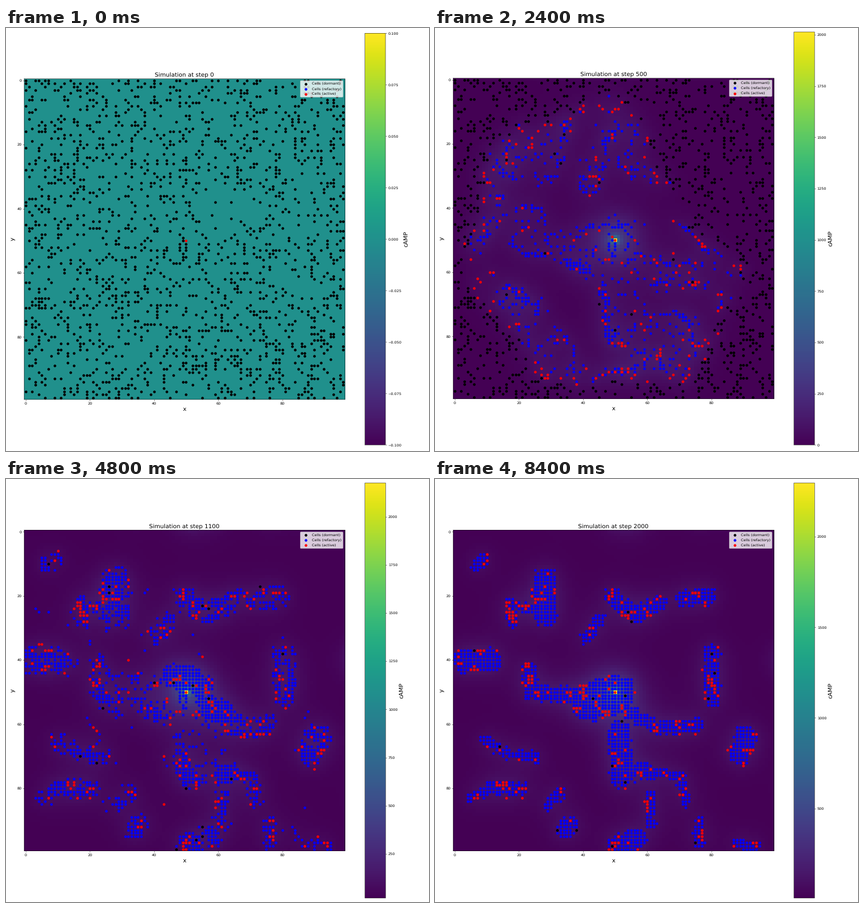
Animation, 748 px wide and 748 px high, one loop 8.8 s. Source, as a matplotlib script:

```python
import numpy as np
import matplotlib.pyplot as plt
from matplotlib.animation import FuncAnimation

plt.rcParams.update({"path.snap": False, "text.hinting": "none"})

SIZE, COUNT, FRAMES = 100, 1720, 22
rng = np.random.default_rng(11)
Y, X = np.mgrid[0:SIZE, 0:SIZE].astype(float)
RADIUS = np.hypot(X - 50, Y - 50)

# Key points of the streams the cells gather in, by half width.
STREAMS = {
    6.0: [[(42, 53), (50, 50.5)]],
    3.6: [[(51, 62), (52, 76)], [(28, 15), (28, 26)], [(3, 40), (11, 40)],
          [(91, 64), (89, 69)], [(51, 98), (56, 96)]],
    2.4: [[(23, 43), (24, 50), (38, 51)], [(55, 57), (64, 61), (75, 60)],
          [(49, 20), (56, 26), (64, 22)], [(71, 21), (79, 20)],
          [(80, 38), (80, 52)], [(56, 74), (61, 75)], [(11, 80), (20, 80)],
          [(34, 93), (36, 91)]],
    1.6: [[(17, 22), (18, 28)], [(20, 23), (25, 24)], [(45, 27), (41, 33)],
          [(61, 75), (70, 76), (72, 84)], [(61, 82), (61, 91)],
          [(9, 65), (16, 69), (25, 70)], [(5, 83), (11, 80)],
          [(29, 85), (33, 81)], [(76, 90), (76, 97)],
          [(88, 97), (94, 98)], [(6, 11), (9, 8)]],
}


def segment_distance(a, b):
    dx, dy = b[0] - a[0], b[1] - a[1]
    t = ((X - a[0]) * dx + (Y - a[1]) * dy) / (dx * dx + dy * dy)
    t = np.clip(t, 0, 1)
    return np.hypot(X - a[0] - t * dx, Y - a[1] - t * dy)


DEPTH = np.min([segment_distance(a, b) - width
                for width, lines in STREAMS.items()
                for line in lines for a, b in zip(line, line[1:])], axis=0)


def lowest(score):
    """The COUNT lattice sites with the lowest score, centre left free."""
    score[50, 50] = np.inf
    rows, cols = np.unravel_index(np.argsort(score, axis=None)[:COUNT], score.shape)
    return np.column_stack([cols, rows]).astype(float)


def gathered(jitter):
    return lowest(DEPTH + jitter * rng.standard_normal(DEPTH.shape))


def match(a, b):
    """Reorder b so that each point of a gets a nearby partner."""
    dist = np.hypot(a[:, None, 0] - b[None, :, 0], a[:, None, 1] - b[None, :, 1])
    dist += 1e-3 * rng.random(dist.shape)
    left, right = np.arange(len(a)), np.arange(len(b))
    out = np.empty_like(b)
    while len(left):
        near = dist.argmin(1)
        mutual = dist.argmin(0)[near] == np.arange(len(left))
        out[left[mutual]] = b[right[near[mutual]]]
        keep = np.ones(len(right), bool)
        keep[near[mutual]] = False
        dist = dist[~mutual][:, keep]
        left, right = left[~mutual], right[keep]
    return out


def arrival(p):
    """Step at which the wave wakes a cell; it lags towards the upper right."""
    dx, dy = p[:, 0] - 50, p[:, 1] - 50
    r, angle = np.hypot(dx, dy), np.arctan2(dy, dx)
    turn = np.angle(np.exp(1j * (angle + 0.55)))
    speed = 1 - 0.6 * np.exp(-(turn / 0.75) ** 2) + 0.07 * np.sin(7 * angle)
    t = np.minimum(8.7 * r ** 1.06 / speed, 620 + 2.2 * r)
    return np.maximum(t + 10 * rng.standard_normal(len(p)), 5)


sparse = 0.12 * np.exp(-((X - 60) ** 2 + (Y - 39) ** 2) / 40)
start = lowest(rng.random((SIZE, SIZE)) + sparse)
loose = match(start, gathered(1.7))
final = match(loose, gathered(0.35))
wake = arrival(start)
order = np.argsort(-wake)

heat = rng.random((SIZE, SIZE))
heat = heat + 0.5 * sum(np.roll(heat, d, ax) for d in (-1, 1) for ax in (0, 1))
wrap = np.hypot(np.minimum(X, SIZE - X), np.minimum(Y, SIZE - Y))
kernel = np.exp(-wrap / 2.8)
KERNEL = np.fft.rfft2(kernel / kernel.sum())
OFFSETS = sorted(((i, j) for i in range(-6, 7) for j in range(-6, 7)),
                 key=lambda o: o[0] ** 2 + o[1] ** 2)


def positions(step):
    """Lattice places of all cells, at most one cell to a site."""
    gather = 1 - np.exp(-np.maximum(step - wake, 0) / 180)[:, None]
    settle = np.clip((step - 700) / 1300, 0, 1) ** 0.6
    p = start + (loose - start) * gather + (final - loose) * gather * settle
    p = np.rint(p).astype(int)
    taken = {(50, 50)}
    for i in order:
        x, y = p[i]
        for dx, dy in OFFSETS:
            site = (x + dx, y + dy)
            if site not in taken and 0 <= min(site) and max(site) < SIZE:
                break
        taken.add(site)
        p[i] = site
    return p


def states(p, step, noise):
    """0 dormant, 1 refractory, 2 active."""
    age = step - wake
    awake = age >= 0
    state = awake.astype(int)
    if awake.any():
        level = heat[p[:, 1], p[:, 0]] + 0.4 * noise.random(COUNT)
        state[awake & (level > np.quantile(level[awake], 0.86))] = 2
        state[awake & (age > 60) & (noise.random(COUNT) < 0.012)] = 0
        state[awake & (age < 28) & (noise.random(COUNT) < 0.7)] = 2
    return state


def limits(step):
    x = max(step - 500, 0) / 400
    return 23 * x * np.exp(1 - x), 746 + 204 * np.log(max(step, 2))


def field(p, step, low, high):
    age = step - wake
    fresh = 1 + 2 * np.exp(-np.maximum(age, 0) / 120)
    source = np.zeros((SIZE, SIZE))
    source[p[:, 1], p[:, 0]] = np.where(age >= 0, fresh, 0)
    camp = low + 290 * np.fft.irfft2(np.fft.rfft2(source) * KERNEL, s=source.shape)
    glow = 470 * np.exp(-RADIUS / 4.5) + 350 * np.exp(-(RADIUS / 1.3) ** 2)
    camp += min(1, step / 150) * glow
    camp[50, 50] = high
    return camp


fig = plt.figure(figsize=(16, 16), dpi=46.75)


def draw(k):
    step = max(k - 1, 0) * 100
    p = positions(step)
    if k == 0:
        low, high, camp = -0.1, 0.1, np.zeros((SIZE, SIZE))
    else:
        low, high = limits(step)
        camp = field(p, step, low, high)
    cells = np.vstack([p, [50, 50]])
    state = np.append(states(p, step, np.random.default_rng(k)), 2)

    fig.clf()
    ax = fig.add_subplot()
    im = ax.imshow(camp, vmin=low, vmax=high, cmap="viridis", interpolation="nearest")
    kinds = [("dormant", "black"), ("refactory", "blue"), ("active", "red")]
    for i, (name, color) in enumerate(kinds):
        x, y = cells[state == i].T
        ax.scatter(x, y, c=color, label=f"Cells ({name})")
    ax.set(xlim=(-0.5, SIZE - 0.5), ylim=(SIZE - 0.5, -0.5))
    ax.set_title(f"Simulation at step {step}", fontsize=16)
    ax.set_xlabel("x", fontsize=16)
    ax.set_ylabel("y", fontsize=16)
    ax.legend(loc="upper right")
    fig.colorbar(im, ax=ax).set_label("cAMP", fontsize=16)
    fig.tight_layout()


anim = FuncAnimation(fig, draw, frames=FRAMES, interval=400,
                     repeat=True, repeat_delay=0, blit=False)
plt.show()
```
